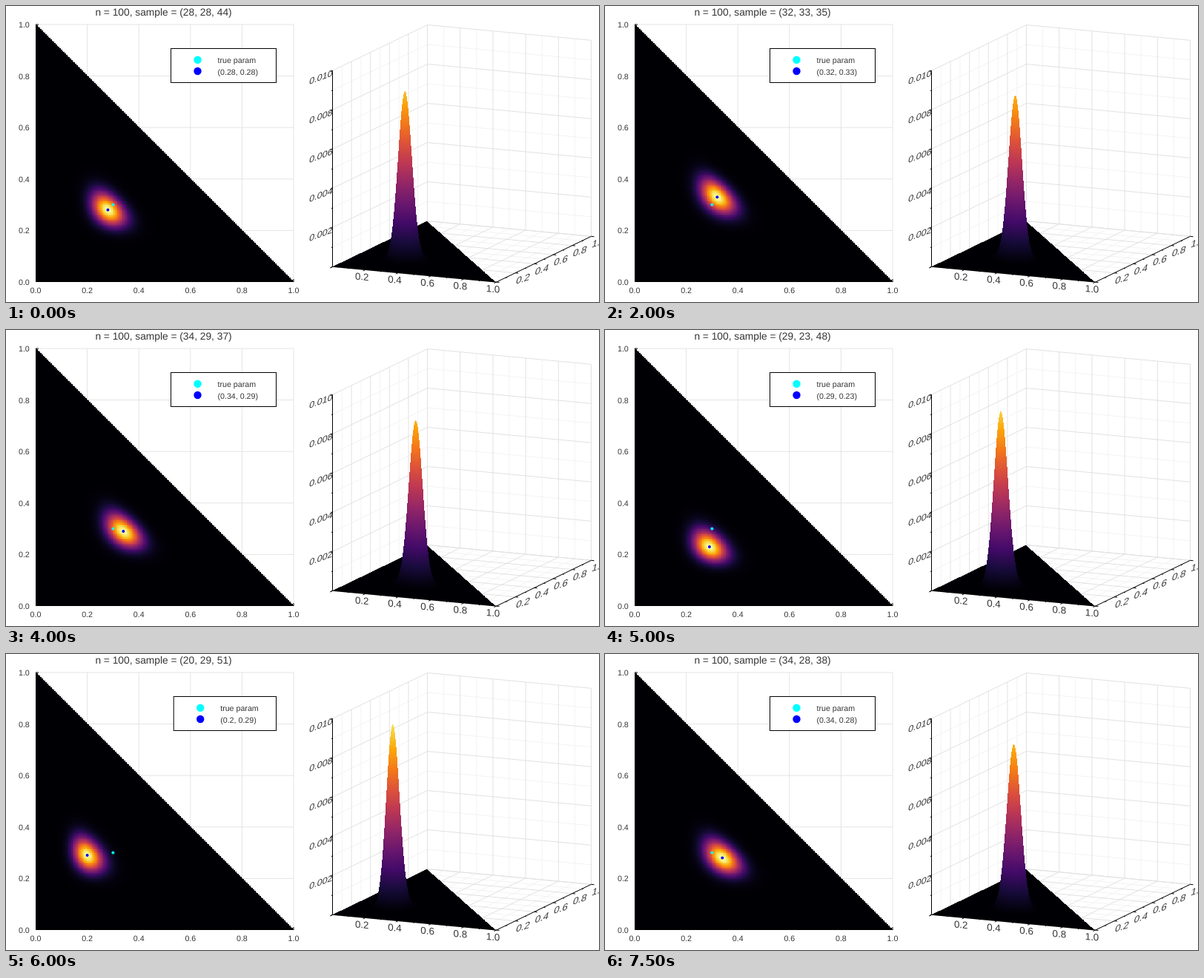
Recreate the animation shown at these times as an HTML page with a canvas. Size 800 by 400 pixels, loop 8000 ms.

```html
<!DOCTYPE html>
<html lang="en">
<head>
<meta charset="utf-8">
<title>Multinomial likelihood</title>
<style>
html, body { margin: 0; width: 100%; height: 100%; overflow: hidden; background: #fff; }
svg, canvas { position: absolute; left: 0; top: 0; width: 800px; height: 400px; }
text { font-family: "Liberation Sans", Arial, sans-serif; fill: #363636; text-rendering: geometricPrecision; }
</style>
</head>
<body>
<svg id="back" viewBox="0 0 800 400"></svg>
<canvas id="plot" width="800" height="400"></canvas>
<svg id="front" viewBox="0 0 800 400"></svg>
<script>
const LOOP = 8000;
const N = 200; // grid cells per unit
// start time, then the first two counts of a sample of 100
const SAMPLES = [
  [0, 28, 28], [500, 32, 32], [1000, 37, 23], [2000, 32, 33], [2500, 37, 28],
  [3000, 33, 24], [3500, 32, 28], [4000, 34, 29], [4500, 32, 25], [5000, 29, 23],
  [5500, 28, 34], [6000, 20, 29], [6500, 33, 31], [7000, 29, 28], [7500, 34, 28]
];
const INFERNO = ['000004', '160b39', '420a68', '6a176e', '932667', 'bc3754',
  'dd513a', 'f37819', 'fca50a', 'f6d746', 'fcffa4']
  .map(h => [0, 2, 4].map(i => parseInt(h.slice(i, i + 2), 16)));

const back = document.getElementById('back');
const front = document.getElementById('front');
const ctx = document.getElementById('plot').getContext('2d');

function add(parent, tag, attrs, content) {
  const el = document.createElementNS('http://www.w3.org/2000/svg', tag);
  for (const k in attrs) el.setAttribute(k, attrs[k]);
  if (content !== undefined) el.textContent = content;
  parent.appendChild(el);
  return el;
}

function line(parent, a, b, stroke) {
  return add(parent, 'line', { x1: a[0], y1: a[1], x2: b[0], y2: b[1], stroke });
}

function label(text, x, y, anchor = 'middle', size = 10.67) {
  return add(front, 'text', { x, y, 'text-anchor': anchor, 'font-size': size }, text);
}

function slanted(text, x, y, slope, lean, size) {
  add(front, 'text', {
    transform: `matrix(1 ${slope} ${lean} 1 ${x} ${y})`, y: size * 0.36,
    'text-anchor': 'middle', 'font-size': size
  }, text);
}

const px = v => 40 + 348 * v;
const py = v => 373 - 348 * v;

// oblique view; z is a fraction of 0.010
const VIEW = { x0: 440.5, y0: 352.3, xx: 221, xy: 20.8, yx: 128, yy: -61.8, h: 265 };
const project = (x, y, z) => [
  VIEW.x0 + VIEW.xx * x + VIEW.yx * y,
  VIEW.y0 + VIEW.xy * x + VIEW.yy * y - VIEW.h * z
];

function color(v) {
  const s = Math.min(Math.max(v, 0), 1) * 10;
  const i = Math.min(Math.floor(s), 9);
  const c = INFERNO[i].map((a, k) => Math.round(a + (INFERNO[i + 1][k] - a) * (s - i)));
  return `rgb(${c})`;
}

function drawFlatAxes() {
  for (let i = 1; i <= 5; i++) {
    const v = i / 5;
    line(back, [px(v), 25], [px(v), 373], '#e4e4e4');
    line(back, [40, py(v)], [388, py(v)], '#e4e4e4');
  }
  for (let i = 0; i <= 5; i++) {
    const t = (i / 5).toFixed(1);
    label(t, 31.8, py(i / 5) + 4, 'end');
    label(t, px(i / 5), 387.5);
  }
  line(front, [40.5, 25], [40.5, 373], '#000');
  line(front, [40, 372.5], [388, 372.5], '#000');
  line(front, [40, 25], [44, 25], '#000');
  line(front, [388, 369], [388, 373], '#000');
}

function drawBoxAxes() {
  const grid = (stroke, ...pts) => add(back, 'polyline', {
    points: pts.map(p => project(...p).join()).join(' '), fill: 'none', stroke
  });
  for (const odd of [1, 0]) {
    const shade = odd ? '#f3f3f3' : '#e1e1e1';
    for (let i = odd; i <= 10; i += 2) {
      const v = i / 10;
      grid(shade, [0, 0, v], [0, 1, v], [1, 1, v]);
      grid(shade, [v, 0, 0], [v, 1, 0], [v, 1, 1]);
      grid(shade, [1, v, 0], [0, v, 0], [0, v, 1]);
    }
  }
  line(front, project(0, 0, 0), project(0, 0, 1), '#000');
  line(front, project(0, 0, 0), project(1, 0, 0), '#000');
  line(front, project(1, 0, 0), project(1, 1, 0), '#000');
  for (let i = 0; i <= 10; i++) {
    const v = i / 10;
    const len = i % 2 ? 0.5 : 1;
    const tick = (p, dx, dy) => line(front, p, [p[0] + dx * len, p[1] + dy * len], '#000');
    const [a, b, c] = [project(v, 0, 0), project(1, v, 0), project(0, 0, v)];
    tick(a, -3, 1.5);
    tick(b, 4, 0.4);
    tick(c, -3, 1.5);
    if (i % 2 || !i) continue;
    slanted(v.toFixed(1), a[0] - 4.5, a[1] + 9, 0.09, 0, 13.3);
    slanted(v.toFixed(1), b[0] + 10.5, b[1] + 7.5, -0.33, -0.25, 13.3);
    slanted((v / 100).toFixed(3), c[0] - 15.5, c[1] + 8.5, -0.37, -0.18, 12.6);
  }
}

drawFlatAxes();
drawBoxAxes();

const dot = (cx, cy, r, fill) => add(front, 'circle', { cx, cy, r, fill });
const title = label('', 212.5, 13, 'middle', 13.75);
dot(px(0.3), py(0.3), 2, '#0ff');
const estimate = dot(0, 0, 2, '#00f');
const frame = add(front, 'rect', { y: 57.5, height: 46, fill: '#fff', stroke: '#000' });
const keys = [dot(0, 72.8, 5.2, '#0ff'), dot(0, 88, 5.2, '#00f')];
const names = [label('true param', 0, 77, 'start'), label('', 0, 93, 'start')];

function likelihood(a, b) {
  const c = 100 - a - b;
  const logFact = n => n < 2 ? 0 : Math.log(n) + logFact(n - 1);
  const k = logFact(100) - logFact(a) - logFact(b) - logFact(c);
  return (x, y) => {
    const r = 1 - x - y;
    if (x <= 0 || y <= 0 || r <= 1e-9) return 0;
    return Math.exp(k + a * Math.log(x) + b * Math.log(y) + c * Math.log(r));
  };
}

function drawHeatmap(f, peak) {
  ctx.save();
  ctx.beginPath();
  ctx.rect(40, 25, 348, 348);
  ctx.clip();
  for (let i = 0; i <= N; i++) {
    const x0 = Math.round(px((i - 0.5) / N)), x1 = Math.round(px((i + 0.5) / N));
    for (let j = 0; i + j <= N; j++) {
      const y0 = Math.round(py((j + 0.5) / N)), y1 = Math.round(py((j - 0.5) / N));
      ctx.fillStyle = color(f(i / N, j / N) / peak);
      ctx.fillRect(x0, y0, x1 - x0, y1 - y0);
    }
  }
  ctx.restore();
}

// Floating horizon: walk each pixel column from front to back and paint what rises above.
function drawSurface(f) {
  const right = Math.floor(VIEW.x0 + VIEW.xx);
  for (let col = Math.floor(VIEW.x0); col <= right; col++) {
    const u = (col + 0.5 - VIEW.x0) / VIEW.xx;
    let horizon = Math.round(project(u, 0, 0)[1]);
    for (let y = 0; y < 1; y += 0.001) {
      const x = u - y * VIEW.yx / VIEW.xx;
      if (x < 0 || Math.floor(x * N) + Math.floor(y * N) >= N - 1) break;
      const z = f(x, y) * 100;
      const top = Math.round(project(x, y, z)[1]);
      if (top >= horizon) continue;
      ctx.fillStyle = color(z);
      ctx.fillRect(col, top, 1, horizon - top);
      horizon = top;
    }
  }
}

function show(a, b) {
  const x = a / 100, y = b / 100;
  const f = likelihood(a, b);
  ctx.clearRect(0, 0, 800, 400);
  drawHeatmap(f, f(x, y));
  drawSurface(f);

  title.textContent = `n = 100, sample = (${a}, ${b}, ${100 - a - b})`;
  estimate.setAttribute('cx', px(x));
  estimate.setAttribute('cy', py(y));
  const text = `(${x}, ${y})`;
  const shift = (12 - text.length) * 3.7;
  names[1].textContent = text;
  frame.setAttribute('x', 222.5 + shift);
  frame.setAttribute('width', 142 - shift);
  keys.forEach(k => k.setAttribute('cx', 258.5 + shift));
  names.forEach(n => n.setAttribute('x', 285.5 + shift));
}

let shown = null;
const start = performance.now();
function update() {
  const t = (performance.now() - start) % LOOP;
  const s = SAMPLES.filter(v => v[0] <= t).pop();
  if (s !== shown) {
    shown = s;
    show(s[1], s[2]);
  }
  requestAnimationFrame(update);
}
update();
</script>
</body>
</html>
```
